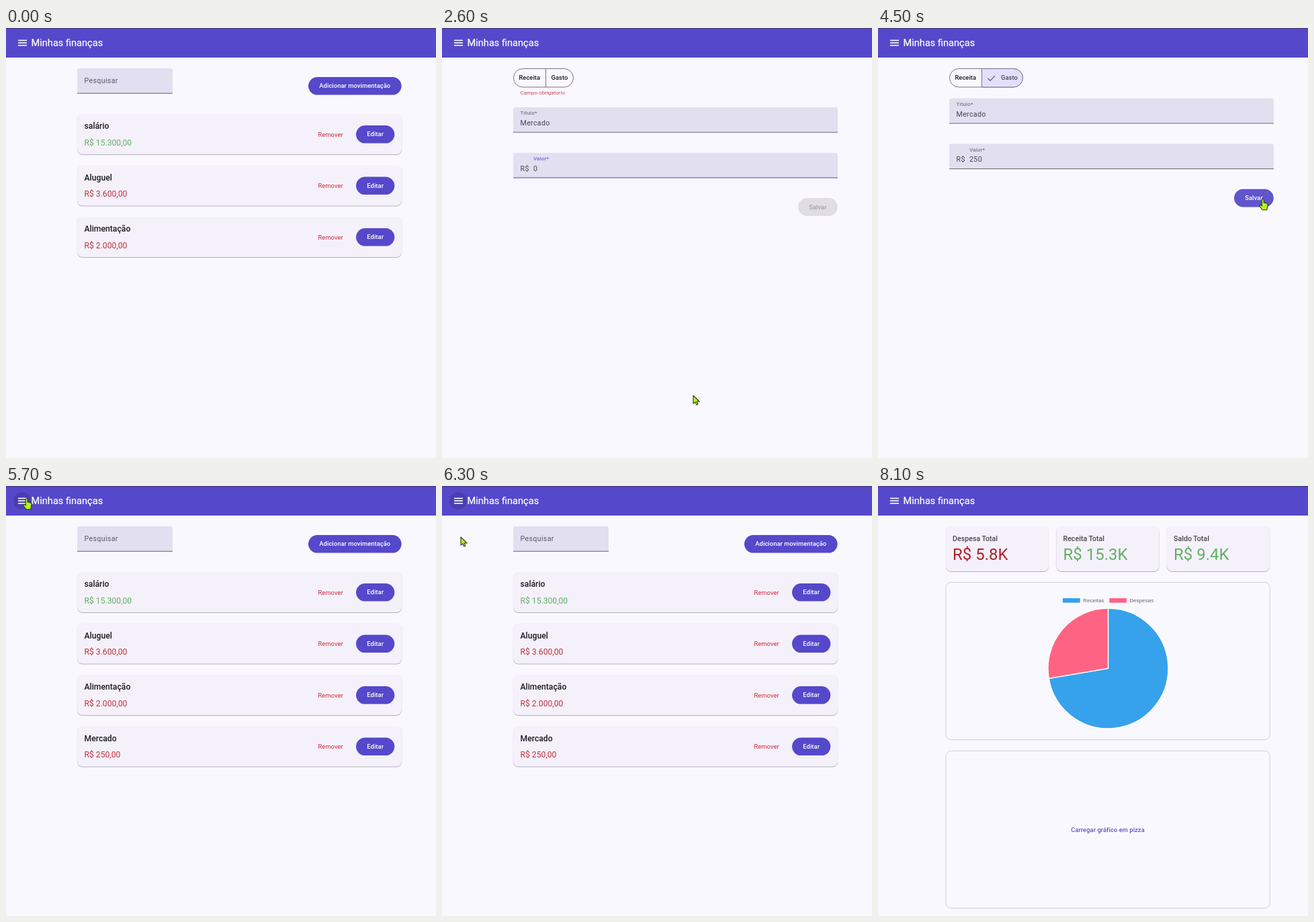
These frames come from a looping animation (640 by 640 pixels, 8.2 s). An HTML page:

```html
<!DOCTYPE html>
<html lang="pt-BR">
<head>
<meta charset="utf-8">
<title>Minhas finanças</title>
<style>
html, body { margin: 0; width: 100%; height: 100%; overflow: hidden; background: #faf8ff; }
svg { display: block; width: 640px; height: 640px; font-family: Roboto, sans-serif; }
</style>
</head>
<body>
<svg id="stage" viewBox="0 0 640 640"></svg>
<script>
const LOOP = 8200, STEP = 100;
const PURPLE = '#5548cb', INK = '#47454e', DARK = '#1d1b22', GREEN = '#62b065', RED = '#c1303a';
const PAGE = '#faf8ff', FIELD = '#e2dff0', PICKED = '#e2dffc';
const stage = document.getElementById('stage');

// Pointer stops: time, x, y of the tip
const STOPS = [
  [400, 505, 20], [700, 520, 84], [900, 520, 84], [1000, 530, 138], [1900, 530, 138],
  [2400, 374, 547], [3500, 374, 547], [3600, 366, 503], [4000, 175, 74], [4100, 175, 74],
  [4400, 573, 254], [5200, 573, 254], [5400, 300, 140], [5700, 31, 18], [5800, 31, 18],
  [6100, 28, 76], [6300, 28, 76], [6900, 342, 261], [7300, 342, 261], [7700, 528, 17]
];
const HAND = [[600, 700], [4000, 4100], [4400, 4600], [5700, 5800], [6100, 6200], [6900, 7300]];

const within = (t, a, b) => t >= a && t <= b;

const rect = (x, y, w, h, r, fill, more = '') =>
  `<rect x="${x}" y="${y}" width="${w}" height="${h}" rx="${r}" fill="${fill}" ${more}/>`;

const path = (d, fill, more = '') => `<path d="${d}" fill="${fill}" ${more}/>`;

const text = (s, x, y, size, fill, more = '') =>
  `<text x="${x}" y="${y}" font-size="${size}" fill="${fill}" ${more}>${s}</text>`;

const MEDIUM = 'font-weight="500"';
const MIDDLE = MEDIUM + ' text-anchor="middle" letter-spacing=".07"';
const SPACED = 'letter-spacing=".33"';

const label = (s, x, y, fill) => text(s, x, y, 9.33, fill, MIDDLE);
const body = (s, x, y, fill = INK) => text(s, x, y, 10.67, fill, SPACED);

function button(s, x, y, w, fill = PURPLE, ink = '#fff') {
  return rect(x, y, w, 26.6, 13.3, fill) + label(s, x + w / 2, y + 16.4, ink);
}

function card(x, y, w, h) {
  return rect(x - 1, y, w + 2, h, 8, '#f1eef8') +
    rect(x, y + 1, w, h, 8, '#b3b1b9') + rect(x, y, w, h, 8, '#f4f1fa');
}

function fieldBox(x, y, w, line = '#66646f') {
  return path(`M${x} ${y + 37.5}v-34.5q0-3 3-3h${w - 6}q3 0 3 3v34.5z`, FIELD) +
    rect(x, y + 36.7, w, 1, 0, line);
}

function header(t) {
  const hover = within(t, 5600, 6300) ? '<circle cx="24" cy="22" r="13" fill="#000" opacity=".13"/>' : '';
  const bars = [17.6, 21.3, 25].map(y => rect(18, y, 13, 1.6, 0, '#fff')).join('');
  return rect(0, 0, 640, 44, 0, PURPLE) + rect(0, 0, 640, 1.2, 0, '#3f3b78') + hover + bars +
    text('Minhas finanças', 37.5, 27, 14.6, '#fff', 'stroke="#fff" stroke-width=".2"');
}

function list(t) {
  const rows = [['salário', '15.300,00'], ['Aluguel', '3.600,00'], ['Alimentação', '2.000,00']];
  if (t >= 4700) rows.push(['Mercado', '250,00']);
  return fieldBox(106, 60, 142) + body('Pesquisar', 116.5, 82, '#5c5965') +
    button('Adicionar movimentação', 450, 73, 138.6) +
    rows.map(([name, sum], i) => {
      const y = 128 + i * 76.5;
      return card(106, y, 483, 60) +
        text(name, 116.5, y + 22, 12.2, DARK, MEDIUM) +
        text('R$ ' + sum, 116.5, y + 46.5, 12.15, i ? RED : GREEN) +
        text('Remover', 464.5, y + 33.5, 9.33, '#d0283c', 'letter-spacing=".07"') +
        button('Editar', 521, y + 17, 57.3);
    }).join('');
}

function toggle(picked) {
  const end = picked ? 216 : 196;
  const line = 'stroke="#787581"';
  return rect(106.5, 60.5, end - 107, 27.5, 13.75, PAGE, line) +
    (picked ? path('M154.5 60.5H201.7a13.75 13.75 0 0 1 0 27.5H154.5z', PICKED, line)
      + path('M163.5 75l3.4 3.4 7.2-7.2', 'none', 'stroke="#55525f" stroke-width="1.1"')
      : path('M154.5 60.5v27.5', 'none', line)) +
    label('Receita', 130.3, 77.2, DARK) + label('Gasto', picked ? 195.5 : 175, 77.2, picked ? INK : DARK);
}

function form(t) {
  const picked = t >= 4100, error = within(t, 2000, 4000);
  const y = error ? 118 : 104.7;
  const inTitle = within(t, 900, 1900), inValue = within(t, 2000, 4000);
  const title = 'Mercado'.slice(0, Math.max(0, (t - 1100) / 100));
  const value = '250'.slice(0, Math.max(0, Math.floor((t - 2800) / 200))) || '0';
  const tint = on => on ? PURPLE : '#625f6b';
  const caption = (s, x, y, on) => text(s, x, y, 8, tint(on), 'letter-spacing=".2"');
  const ready = picked;
  return toggle(picked) +
    (error ? text('Campo obrigatorio', 116.5, 98.7, 8, '#c8455a') : '') +
    fieldBox(106, y, 483, inTitle ? PURPLE : '#6d6a86') +
    (t < 900 ? body('Título*', 116.5, y + 22.5) : caption('Título*', 116.5, y + 11.3, inTitle)) +
    body(title, 116.5, y + 27) +
    fieldBox(106, y + 67.7, 483, inValue ? PURPLE : '#66646f') +
    caption('Valor*', 136, y + 79, inValue) +
    body('R$', 116.5, y + 94.7) + body(value, 136, y + 94.7) +
    button('Salvar', 530, y + 135.1, 58.8, !ready ? '#e0dde4' : t >= 4400 ? '#6055cb' : PURPLE, ready ? '#fff' : '#a19fa7');
}

function pie(t) {
  const p = Math.min(1, (t - 7300) / 600), grow = 1 - (1 - p) ** 4;
  const cx = 342.5, cy = 271.5, r = 89.5, turn = 2 * Math.PI * grow;
  const at = a => `${cx + r * Math.sin(a)} ${cy - r * Math.cos(a)}`;
  const slice = (a, b, fill) => path(
    `M${cx} ${cy}L${at(a)}A${r} ${r} 0 ${b - a > Math.PI ? 1 : 0} 1 ${at(b)}z`,
    fill, 'stroke="#fff" stroke-width="1.4"');
  const key = (s, x, fill) => rect(x, 167, 25.7, 6.7, 0, fill) +
    text(s, x + 30.3, 172.8, 8, '#666', 'font-family="Liberation Sans, Arial, sans-serif"');
  const share = 15.3 / 21.15;
  return key('Receitas', 275, '#36a2eb') + key('Despesas', 344.3, '#ff6384') +
    slice(0, turn * share, '#36a2eb') + slice(turn * share, turn, '#ff6384');
}

function dashboard(t) {
  const stats = [['Despesa', '5.8K', '#b3202a'], ['Receita', '15.3K', GREEN], ['Saldo', '9.4K', GREEN]];
  const load = y => label('Carregar gráfico em pizza', 342, y, '#5f52c8');
  const ripple = t >= 7100 ? rect(283, 247, 118, 26.6, 12, '#d3d0ee') : '';
  const hover = t >= 6900 ? rect(278.7, 247, 126, 26.6, 13.3, '#e6e3f7') + ripple : '';
  return stats.map(([name, sum, fill], i) => {
    const x = 101 + i * 164.5;
    return card(x, 60, 153, 67) + text(name + ' Total', x + 10, 82, 10.67, INK, MEDIUM) +
      text('R$ ' + sum, x + 10, 110, 24, fill);
  }).join('') +
    [143.5, 394.3].map(y => rect(101, y, 482.3, 234, 7.5, 'none', 'stroke="#cfccd6"')).join('') +
    (t < 7400 ? hover + load(263.5) : pie(t)) + load(514.5);
}

function drawer(t) {
  const open = t === 5800 || t === 6200 ? .5 : within(t, 5900, 6100) ? 1 : 0;
  if (!open) return '';
  const ripple = t >= 6200 ? 220 : 199;
  const hover = t < 6000 ? '' : rect(10.7, 60, 220.3, 32, 16, '#e9e7ee') +
    (t >= 6100 ? path(`M26.7 60H${10.7 + ripple - (t >= 6200 ? 16 : 0)}v32H26.7a16 16 0 0 1 0-32z`, '#cfced3') : '');
  return rect(0, 44, 640, 596, 0, '#2d2b37', `opacity="${.4 * open}"`) +
    `<g transform="translate(${-241 * (1 - open)} 0)">` +
    path('M0 44H231q11.5 0 11.5 11V640H0z', '#000', 'opacity=".2"') +
    path('M0 44H231q10.5 0 10.5 10.5V640H0z', PAGE) +
    hover + rect(10.7, 103, 220.3, 32, 16, PICKED) +
    body('Home', 21.5, 79.5) + body('Transações', 21.5, 122.7) + body('Sair', 21.5, 176.3) + '</g>';
}

function pointer(t) {
  const i = STOPS.findIndex((s, k) => k && t <= s[0]);
  if (t < STOPS[0][0] || i < 0) return '';
  const [t0, x0, y0] = STOPS[i - 1], [t1, x1, y1] = STOPS[i];
  const p = (t - t0) / (t1 - t0);
  const shape = HAND.some(([a, b]) => within(t, a, b))
    ? 'M-1.8 1.6Q-.3-.9 1.2 1.4V6L5.6 7Q7.4 7.6 7 10L5.8 16.8H-1L-5 11.2Q-5.4 9-3.2 9.6L-1.8 10.8z'
    : 'M0 0V12.2L2.8 9.8 4.8 14 7 13 5.1 9H9.2z';
  return path(shape, '#b4f41c', `stroke="#2f3a1c" stroke-width="1.1" stroke-linejoin="round"
    transform="translate(${x0 + (x1 - x0) * p} ${y0 + (y1 - y0) * p})"`);
}

function scene(t) {
  const page = t >= 6400 ? dashboard : within(t, 700, 4600) ? form : list;
  return rect(0, 0, 640, 640, 0, PAGE) + page(t) + drawer(t) + header(t) + pointer(t);
}

let start, last = -1;
function tick(now) {
  start ??= now;
  const t = Math.floor((now - start) % LOOP / STEP) * STEP;
  if (t !== last) stage.innerHTML = scene(last = t);
  requestAnimationFrame(tick);
}
stage.innerHTML = scene(0);
requestAnimationFrame(tick);
</script>
</body>
</html>
```
